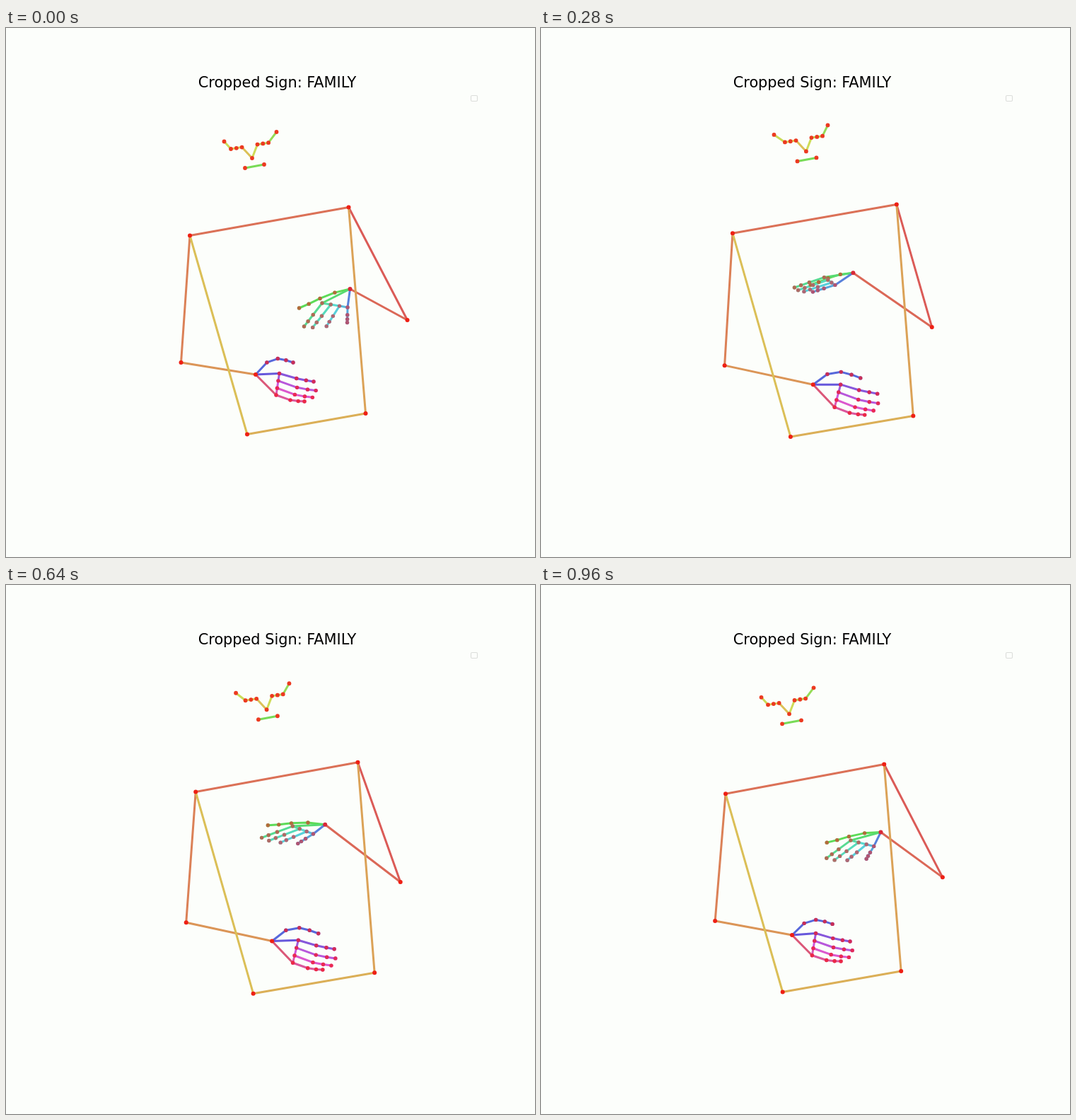
Animation, 748 px wide and 748 px high, one loop 1.04 s. Source, as an HTML page with a canvas:

```html
<!DOCTYPE html>
<html lang="en">
<head>
<meta charset="utf-8">
<title>Cropped Sign</title>
<style>
  html, body { margin: 0; width: 100%; height: 100%; overflow: hidden; background: #fcfefb; }
  canvas { display: block; }
</style>
</head>
<body>
<canvas id="stage" width="748" height="748"></canvas>
<script>
const ctx = document.getElementById('stage').getContext('2d');
const LOOP = 1040, STEP = 40, LAST = 960;

const mix = (a, b, f) => [a[0] + (b[0] - a[0]) * f, a[1] + (b[1] - a[1]) * f];
const shift = (p, x, y) => [p[0] + x, p[1] + y];
const add = (p, q) => shift(p, ...q);
const bump = (t, mid, width) => Math.exp(-(((t - mid) / width) ** 2));
const ease = (t, from, to) => {
  const u = Math.min(1, Math.max(0, (t - from) / (to - from)));
  return u * u * (3 - 2 * u);
};

// Rest point plus weighted displacements
const blend = (rest, moves, weights) =>
  moves.reduce((p, [x, y], i) => shift(p, x * weights[i], y * weights[i]), rest);

// How far each movement has gone at time t
function motion(t) {
  const edge = bump(t, 270, 85);
  return {
    edge,
    lean: edge + 0.75 * bump(t, 600, 120),
    lift: 1.1 * Math.sin(Math.PI * t / 1150) ** 0.7,
    swing: ease(t, 60, 300) * (1 - 0.55 * ease(t, 600, 1000)),
    curl: ease(t, 0, 120) * (1 - ease(t, 420, 620)) * (1 - edge)
  };
}

const hsl = hue => `hsl(${hue}, 65%, 60%)`;

function line(hue, ...pts) {
  ctx.strokeStyle = hsl(hue);
  ctx.beginPath();
  pts.forEach(p => ctx.lineTo(...p));
  ctx.stroke();
}

function disc(p, r, fill) {
  ctx.fillStyle = fill;
  ctx.beginPath();
  ctx.arc(...p, r, 0, 2 * Math.PI);
  ctx.fill();
}

function tinted(p, hue, alpha) {
  disc(p, 2.7, hsl(hue));
  disc(p, 2.7, `rgba(240, 25, 40, ${alpha})`);
}

// Thumb joints lie on a bowed line from wrist to tip
const thumbJoints = (wrist, tip, bow) =>
  [0.3, 0.59, 0.81, 1].map((f, i) => shift(mix(wrist, tip, f), 0, bow[i]));

// Knuckles are spread evenly between those of index and pinky; sag bends the fingers
const fingerJoints = (index, pinky, tips, sag) =>
  [0, 0.34, 0.68, 1].map((f, i) => {
    const root = mix(index, pinky, f), drop = sag * Math.min(i + 1, 2);
    return [root, shift(mix(root, tips[i], 0.5), 0, drop),
      shift(mix(root, tips[i], 0.78), 0, drop * 0.6), tips[i]];
  });

function drawHand(wrist, thumb, fingers, hue, step, alpha) {
  const hues = fingers.map((_, i) => hue + 30 + step * i);
  const roots = fingers.map(f => f[0]);
  line(hue, wrist, ...thumb);
  line(hue + 15, wrist, roots[0]);
  fingers.forEach((f, i) => line(hues[i], ...f));
  for (let i = 0; i < 3; i++) line(hues[i] + step / 2, roots[i], roots[i + 1]);
  line(hues[3] + 17, wrist, roots[3]);
  thumb.forEach(p => tinted(p, hue, alpha));
  fingers.forEach((f, i) => f.forEach(p => tinted(p, hues[i], alpha)));
}

function highHand(wrist, { swing, curl, edge }) {
  const at = (rest, ...moves) => add(wrist, blend(rest, moves, [swing, curl, edge]));
  const index = at([-39.5, 20], [-6.5, -18], [1, -1], [5, 4]);
  const pinky = at([-3.5, 26], [-13.5, -13], [4, -6.5], [-9, 4]);
  const first = at([-65, 53], [-25, -35], [10.5, -1], [6.5, 2]);
  const last = at([-4, 47.5], [-35, -21], [8, -10.5], [-19, 0]);
  const thumb = at([-72, 27], [-9, -26.5], [5, 6], [21, 16]);
  const tips = [first, shift(mix(first, last, 0.2), 0, 2.5), shift(mix(first, last, 0.52), 0, 2.5), last];
  drawHand(wrist, thumbJoints(wrist, thumb, [-3, -2.5, -0.7, 0]),
    fingerJoints(index, pinky, tips, 0), 117, 19, 0.58);
}

function lowHand(wrist, { lean, lift }) {
  const at = (rest, ...moves) => add(wrist, blend(rest, moves, [lean, lift]));
  const index = at([33.5, -1.5], [5.5, 2.7], [0, -1.5]);
  const pinky = at([29, 29], [2.3, 3.4], [-1, -0.5]);
  const first = at([82, 10], [9, 4.2], [0, -1.5]);
  const last = at([69, 38], [4, 6.2], [0, -1.5]);
  const thumb = at([53, -17], [9, 6], [6, 2]);
  const tips = [first, shift(mix(first, last, 0.45), 9, 0), shift(mix(first, last, 0.78), 8.5, 0.5), last];
  drawHand(wrist, thumbJoints(wrist, thumb, [-12, -12.4, -6.5, 0]),
    fingerJoints(index, pinky, tips, 1.3), 232, 22, 0.74);
}

// Turning the head slides the ears and mouth against the nose
function drawFace(nose, { lean }) {
  const at = (x, y, turn = 0) => shift(nose, x - turn * lean, y);
  const earL = at(-39.5, -23.5, 6), earR = at(34.5, -37, 4);
  const mouthL = at(-10, 14, 2.5), mouthR = at(17, 9, 2.5);
  const eyes = x => [0, 1, 2].map(i => at(x + 7.8 * i, -13 - 0.17 * (x + 30) - 1.2 * i));
  const left = eyes(-30), right = eyes(7.5);
  line(68, earL, left[0]);
  line(56, ...left);
  line(48, left[2], nose);
  line(66, nose, right[0]);
  line(76, ...right);
  line(92, right[2], earR);
  line(105, mouthL, mouthR);
  [earL, ...left, nose, ...right, earR, mouthL, mouthR].forEach(p => disc(p, 2.9, '#ec3a20'));
}

function drawFixed() {
  ctx.fillStyle = '#fcfefb';
  ctx.fillRect(0, 0, 748, 748);
  ctx.fillStyle = '#000';
  ctx.font = '20.83px "DejaVu Sans", sans-serif';
  ctx.textAlign = 'center';
  ctx.fillText('Cropped Sign: FAMILY', 383.5, 84);
  ctx.strokeStyle = '#dcdedb';
  ctx.lineWidth = 1.2;
  ctx.beginPath();
  ctx.roundRect(657.5, 95.5, 9, 8, 1.5);
  ctx.stroke();
}

function draw(t) {
  const now = motion(t);
  const at = (rest, ...moves) => blend(rest, moves, [now.lean, now.lift]);
  const shoulderL = at([260, 293.5], [9.8, -5.5], [1.5, 2.5]);
  const shoulderR = at([484.5, 253.5], [17.7, -4], [1, 0]);
  const elbowL = at([247.5, 473], [14, 1.6], [-2, 3]);
  const elbowR = at([567.5, 413], [-15.4, 9.6], [0.5, 0.5]);
  const wristL = at([353, 490], [29.6, 8], [3, 7.5]);
  const wristR = at([486.5, 369], [-38, 2], [-9, -29]);
  const hipL = at([341, 574.5], [11.2, 2.3], [1, 1.5]);
  const hipR = at([508.5, 545], [17.2, 2.3], [1, 1.5]);
  const nose = at([348, 184], [23.4, -7.5], [4.5, -2.5]);

  drawFixed();
  ctx.lineWidth = 3;
  ctx.lineCap = ctx.lineJoin = 'round';
  line(12, shoulderL, shoulderR);
  line(2, shoulderR, elbowR);
  line(8, elbowR, wristR);
  line(19, shoulderL, elbowL);
  line(28, elbowL, wristL);
  line(34, shoulderR, hipR);
  line(40, hipL, hipR);
  line(47, shoulderL, hipL);
  drawFace(nose, now);
  highHand(wristR, now);
  lowHand(wristL, now);
  for (const p of [shoulderL, shoulderR, elbowL, elbowR, wristL, hipL, hipR]) disc(p, 3, '#ee2015');
  disc(wristR, 3, '#d92838');
}

const start = performance.now();
function tick() {
  const t = (performance.now() - start) % LOOP;
  draw(Math.min(LAST, Math.floor(t / STEP) * STEP));
  requestAnimationFrame(tick);
}
tick();
</script>
</body>
</html>
```
